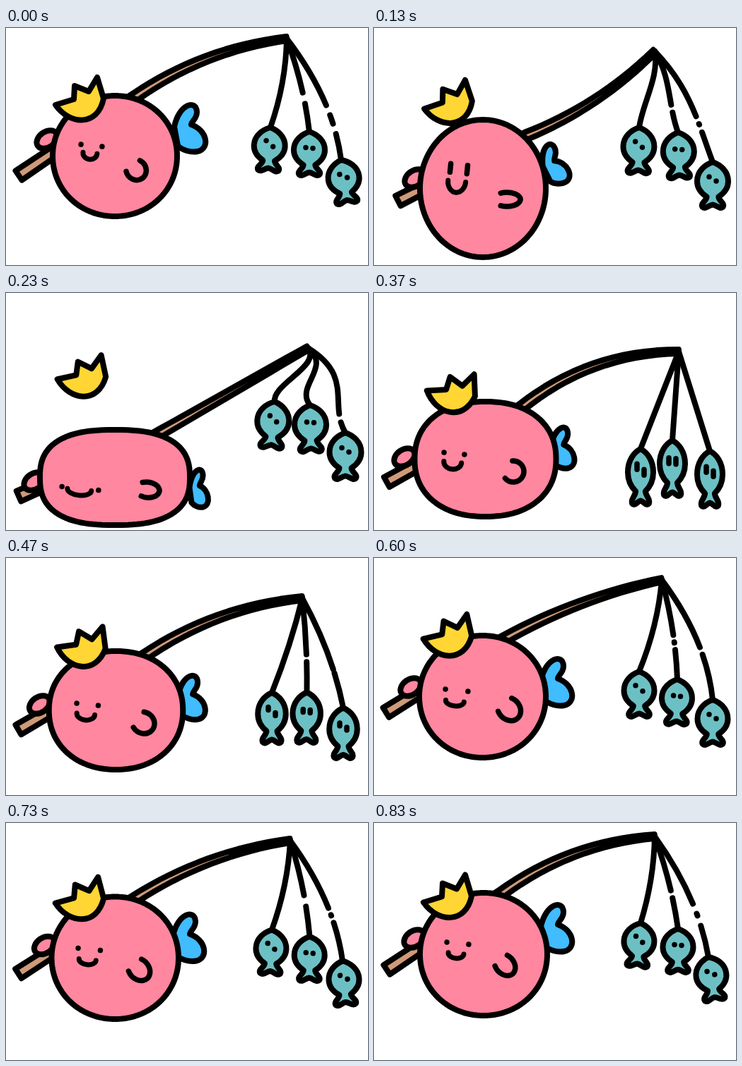
An HTML page with a canvas for the animation above (0.96 s loop, 512 by 336 pixels).

```html
<!DOCTYPE html>
<html lang="en">
<head>
<meta charset="utf-8">
<title>Hopping fisher</title>
<style>
  html, body { margin: 0; width: 100%; height: 100%; overflow: hidden; background: #fff; }
  canvas { display: block; width: 512px; height: 336px; }
</style>
</head>
<body>
<canvas id="stage" width="512" height="336"></canvas>
<script>
const ctx = document.getElementById('stage').getContext('2d');
const PINK = '#ff879f', GOLD = '#ffd633', BLUE = '#40bcff', TEAL = '#6cc0c4', WOOD = '#cf9a78';
const LOOP = 960;

/* body: x, y, rx, ry          crown: x, y, turn         tail: x, y, turn, width
   rod: butt, shoulder, tip, bend                        hand: x, y
   face: x, y, eye span, mouth drop, mouth rx, ry, eye half height
   arm: x, y, rx, ry, turn     fish: top x, y, turn      size: fish half width, height, eye half height
   slack: sag, curl            gaps: breaks in the second and third line */
const high = {
  body: [154, 181.5, 88, 85.5], crown: [104, 104, 0], tail: [259, 137, 0, 1],
  rod: [18, 209, 182, 98, 397, 15, 28], hand: [58, 158],
  face: [121, 166.5, 15, 11, 10, 9, 0], arm: [184, 201, 15, 14, .9],
  fish: [[374, 141, .05], [429, 147, 0], [474, 187, -.14]], size: [22, 62, 0],
  slack: [7, 0], gaps: [16, 43]
};
const fall = {
  body: [154, 227.5, 89, 97.5], crown: [105, 108.5, -.03], tail: [253, 189, -.3, .75],
  rod: [34, 245, 215, 153, 397, 33, -22], hand: [58, 213],
  face: [120, 199.5, 12, 18, 12.5, 16, 6], arm: [188, 243, 19, 10, 0],
  fish: [[375, 141, .02], [430, 148, -.03], [479, 190, 0]], size: [22, 65, 0],
  slack: [6, 8], gaps: [11, 24]
};
const squash = {
  body: [154, 261.5, 106, 67.5], crown: [107, 120, .08], tail: [272, 273, 0, .6],
  rod: [18, 288, 208, 204, 427, 78, 0], hand: [40, 267],
  face: [105, 277, 26, 2, 17, 8, 0], arm: [200, 279, 17, 11, .1],
  fish: [[380, 154, .08], [430, 159, -.02], [480, 198, 0]], size: [22.5, 66, 0],
  slack: [8, 27], gaps: [0, 12]
};
const rise = {
  body: [157.5, 235.5, 100, 81.5], crown: [109, 142, .25], tail: [266, 215, 0, .75],
  rod: [18, 268, 206, 164, 431, 83, 42], hand: [43, 233],
  face: [113.5, 227.5, 14.5, 12.5, 12.5, 10, 0], arm: [197, 253, 15, 15, .4],
  fish: [[377, 221, 0], [422, 209, 0], [475, 224, 0]], size: [18, 79, 4],
  slack: [0, 0], gaps: [0, 0]
};
const climb = {
  body: [153.5, 196.5, 89.5, 86.5], crown: [104, 112, .07], tail: [257, 171, 0, 1],
  rod: [17, 219, 184, 115, 407, 31, 18], hand: [52, 183],
  face: [117, 187.5, 16, 15.5, 13, 7, 0], arm: [191, 214, 18, 15, .8],
  fish: [[375, 161, 0], [429, 172, .02], [479, 201, 0]], size: [21.5, 64, 0],
  slack: [7, 0], gaps: [21, 11]
};
const near = {
  body: [155, 186, 90, 87], crown: [104, 107.5, 0], tail: [257, 144, 0, 1],
  rod: [18, 208, 180, 100, 397, 19, 33], hand: [57, 164],
  face: [118.5, 170.5, 15.5, 14.5, 11, 7, 0], arm: [185, 201, 17, 13, .85],
  fish: [[377, 142, .08], [430, 150, 0], [473, 190, -.15]], size: [21.5, 62, 0],
  slack: [6, 0], gaps: [11, 33]
};

const mix = (a, b) => Array.isArray(a) ? a.map((v, i) => mix(v, b[i])) : (a + b) / 2;
const between = (p, q) =>
  Object.fromEntries(Object.keys(p).map(key => [key, mix(p[key], q[key])]));

// Each pose holds from its start time until the next one.
const steps = [
  [0, high], [130, fall], [230, squash], [370, rise],
  [470, between(rise, climb)], [600, climb], [730, between(climb, near)], [830, near]
];

// Builds a path in local space; the outline keeps its width under scaling.
function shape(fill, x, y, turn, sx, sy, build) {
  ctx.save();
  ctx.translate(x, y);
  ctx.rotate(turn);
  ctx.scale(sx, sy);
  ctx.beginPath();
  build();
  ctx.restore();
  ctx.closePath();
  ctx.fillStyle = fill;
  ctx.fill();
  ctx.stroke();
}

const polygon = points => points.forEach(p => ctx.lineTo(...p));

function stroke(build, width = 8) {
  ctx.lineWidth = width;
  ctx.beginPath();
  build();
  ctx.stroke();
  ctx.lineWidth = 8;
}

const eye = (x, y, tall) => stroke(() => {
  ctx.moveTo(x, y - tall);
  ctx.lineTo(x, y + tall + .01);
}, 7.5);

// Straight from butt to shoulder, then bent to the tip, tapering all the way
function drawRod([bx, by, mx, my, tx, ty, bend]) {
  const len = Math.hypot(tx - mx, ty - my);
  const cx = (mx + tx) / 2 + bend * (ty - my) / len;
  const cy = (my + ty) / 2 - bend * (tx - mx) / len;
  const spine = [[bx, by]];
  for (let t = 0; t <= 1; t += 1 / 16) {
    const u = 1 - t;
    spine.push([u * u * mx + 2 * u * t * cx + t * t * tx, u * u * my + 2 * u * t * cy + t * t * ty]);
  }
  const edge = side => spine.map(([x, y], i) => {
    const a = spine[Math.max(0, i - 1)], b = spine[Math.min(spine.length - 1, i + 1)];
    const angle = Math.atan2(b[1] - a[1], b[0] - a[0]);
    const half = side * (8 - 5 * (x - bx) / (tx - bx));
    return [x - half * Math.sin(angle), y + half * Math.cos(angle)];
  });
  shape(WOOD, 0, 0, 0, 1, 1, () => polygon([...edge(-1), ...edge(1).reverse()]));
}

// A wide break leaves a small piece of line in its middle.
function breakAt(start, gap) {
  const bit = Math.max(1, gap - 30), side = (gap - bit) / 2;
  return gap > 20 ? [start, side, bit, side, 999, 0] : [start, gap, 999, 0];
}

function drawLines({ rod, fish, slack: [sag, curl], gaps }) {
  const [x, y] = rod.slice(4);
  const dashes = [[], breakAt(80, gaps[0]), breakAt(110, gaps[1])];
  fish.forEach(([fx, fy], i) => {
    const dx = (fx - x) / 3, dy = (fy - y) / 3, bulge = sag * [1, .8, 2.6][i];
    ctx.setLineDash(dashes[i]);
    stroke(() => {
      ctx.moveTo(x, y);
      ctx.bezierCurveTo(x + dx + bulge + curl, y + dy, fx - dx + bulge - curl, fy - dy, fx, fy);
    });
  });
  ctx.setLineDash([]);
}

function drawFish([x, y, turn], [w, h, stare], tilt) {
  shape(TEAL, x, y, turn, w, h, () => {
    ctx.moveTo(0, 0);
    ctx.bezierCurveTo(.5, .06, 1, .2, 1, .42);
    ctx.bezierCurveTo(1, .6, .65, .7, .38, .76);
    ctx.bezierCurveTo(.4, .85, .8, .9, .66, .98);
    ctx.bezierCurveTo(.45, 1.04, .25, .94, 0, .93);
    ctx.bezierCurveTo(-.25, .94, -.45, 1.04, -.66, .98);
    ctx.bezierCurveTo(-.8, .9, -.4, .85, -.38, .76);
    ctx.bezierCurveTo(-.65, .7, -1, .6, -1, .42);
    ctx.bezierCurveTo(-1, .2, -.5, .06, 0, 0);
  });
  ctx.save();
  ctx.translate(x, y);
  ctx.rotate(turn);
  for (const side of [-5, 5]) eye(side, h * .37 + side * tilt, stare);
  ctx.restore();
}

function drawTail([x, y, turn, width]) {
  shape(BLUE, x, y, turn, width, (1 + width) / 2, () => {
    ctx.moveTo(-21, 3);
    ctx.bezierCurveTo(-14, -30, 10, -36, 11, -18);
    ctx.bezierCurveTo(11, -8, 4, -6, 3, 0);
    ctx.bezierCurveTo(26, 8, 30, 34, 12, 38);
    ctx.bezierCurveTo(2, 40, -10, 36, -16, 30);
  });
}

// Superellipse that gets boxier the flatter it is
function drawBody([x, y, rx, ry]) {
  const power = 2 / Math.max(2, 1 + rx / ry);
  const soft = v => Math.sign(v) * Math.abs(v) ** power;
  shape(PINK, x, y, 0, rx, ry, () => {
    for (let a = 0; a < 2 * Math.PI; a += Math.PI / 60) ctx.lineTo(soft(Math.cos(a)), soft(Math.sin(a)));
  });
}

function drawFace([x, y, span, drop, rx, ry, tall]) {
  ctx.save();
  ctx.translate(x, y);
  ctx.rotate(.1);
  eye(-span, 0, tall);
  eye(span, 0, tall);
  stroke(() => ctx.ellipse(-1, drop, rx, ry, 0, 0, Math.PI), 7);
  ctx.restore();
}

function drawCrown([x, y, turn]) {
  shape(GOLD, x, y, turn, 1, 1, () => {
    polygon([[-34, 5], [-8, -3], [-7, -22], [13, -14], [25, -34], [34, -4]]);
    ctx.bezierCurveTo(26, 36, -14, 34, -34, 5);
  });
}

function draw(pose) {
  ctx.fillStyle = '#fff';
  ctx.fillRect(0, 0, 512, 336);
  ctx.lineWidth = 8;
  ctx.lineCap = ctx.lineJoin = 'round';

  drawRod(pose.rod);
  shape(PINK, ...pose.hand, -.6, 16, 11, () => ctx.arc(0, 0, 1, 0, 7));
  drawLines(pose);
  pose.fish.forEach((f, i) => drawFish(f, pose.size, [.8, .1, .6][i]));
  drawTail(pose.tail);
  drawBody(pose.body);
  drawFace(pose.face);
  stroke(() => ctx.ellipse(...pose.arm, -2.05, 2.05), 7.5);
  drawCrown(pose.crown);
}

const start = performance.now();
function tick() {
  const t = (performance.now() - start) % LOOP;
  draw(steps.filter(([from]) => from <= t).pop()[1]);
  requestAnimationFrame(tick);
}
tick();
</script>
</body>
</html>
```
